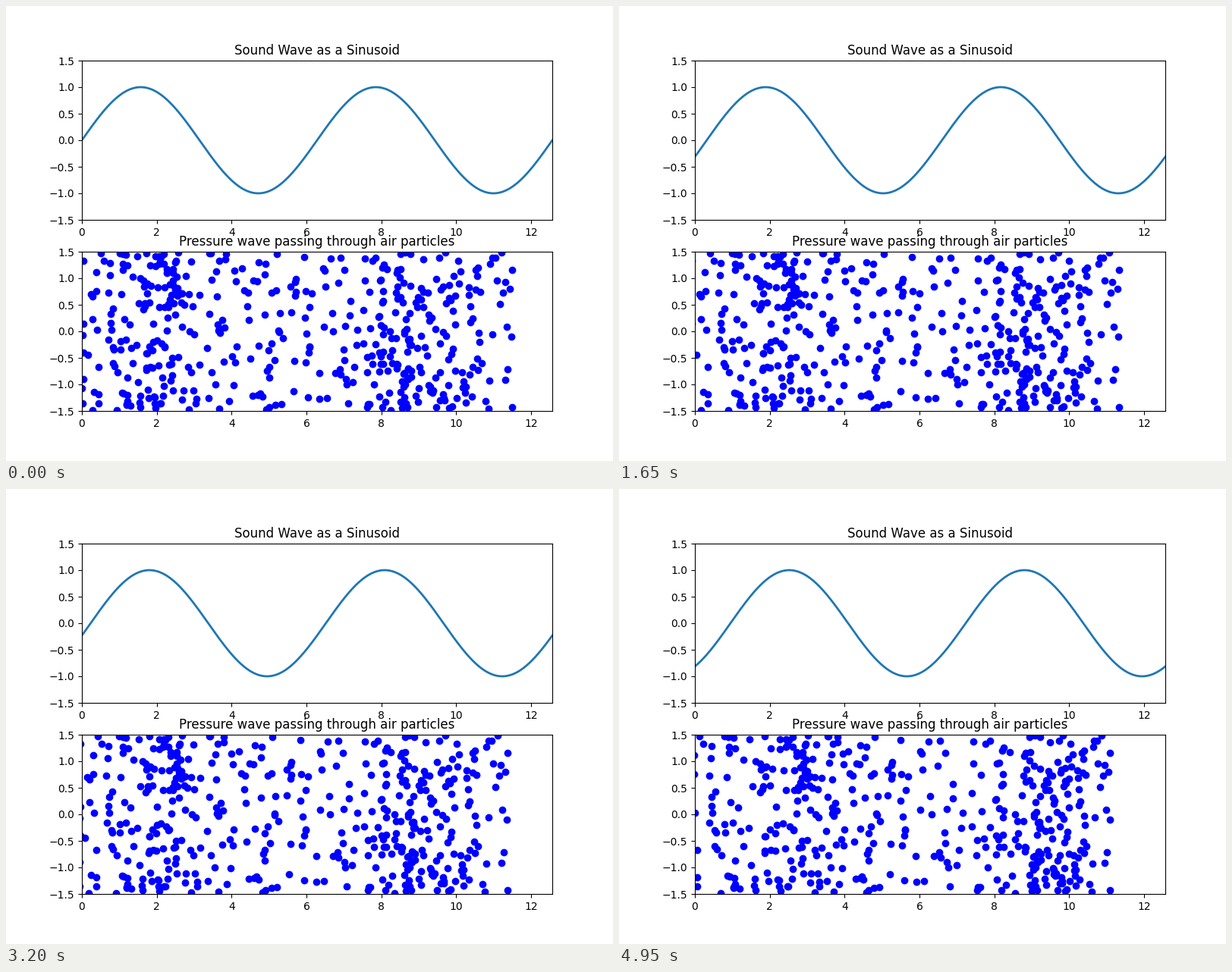
Animation, 800 px wide and 600 px high, one loop 5 s. Source, as a matplotlib script:

```python
import numpy as np
import matplotlib.pyplot as plt
from matplotlib.animation import FuncAnimation

LENGTH = 4 * np.pi
PARTICLES = 500
STEP = 0.2  # phase advance per frame
FRAMES = 100


def displaced(rest, phase):
    """Horizontal place of air particles while the wave passes."""
    return rest - 1 + 0.5 * np.sin(rest - phase)


rng = np.random.default_rng(12)
rest = rng.uniform(0, LENGTH, PARTICLES)
height = rng.uniform(-1.5, 1.5, PARTICLES)

fig, (wave_ax, air_ax) = plt.subplots(2, 1, figsize=(8, 6), dpi=100)
for ax, title in ((wave_ax, "Sound Wave as a Sinusoid"),
                  (air_ax, "Pressure wave passing through air particles")):
    ax.set_xlim(0, LENGTH)
    ax.set_ylim(-1.5, 1.5)
    ax.set_title(title)

x = np.linspace(0, LENGTH, 1000)
wave, = wave_ax.plot(x, np.sin(x), lw=2)
air, = air_ax.plot(displaced(rest, 0), height, "bo")


def update(frame):
    phase = STEP * frame
    wave.set_ydata(np.sin(x - phase))
    air.set_xdata(displaced(rest, phase))
    return wave, air


anim = FuncAnimation(fig, update, frames=FRAMES, interval=50, repeat=True)
plt.show()
```
